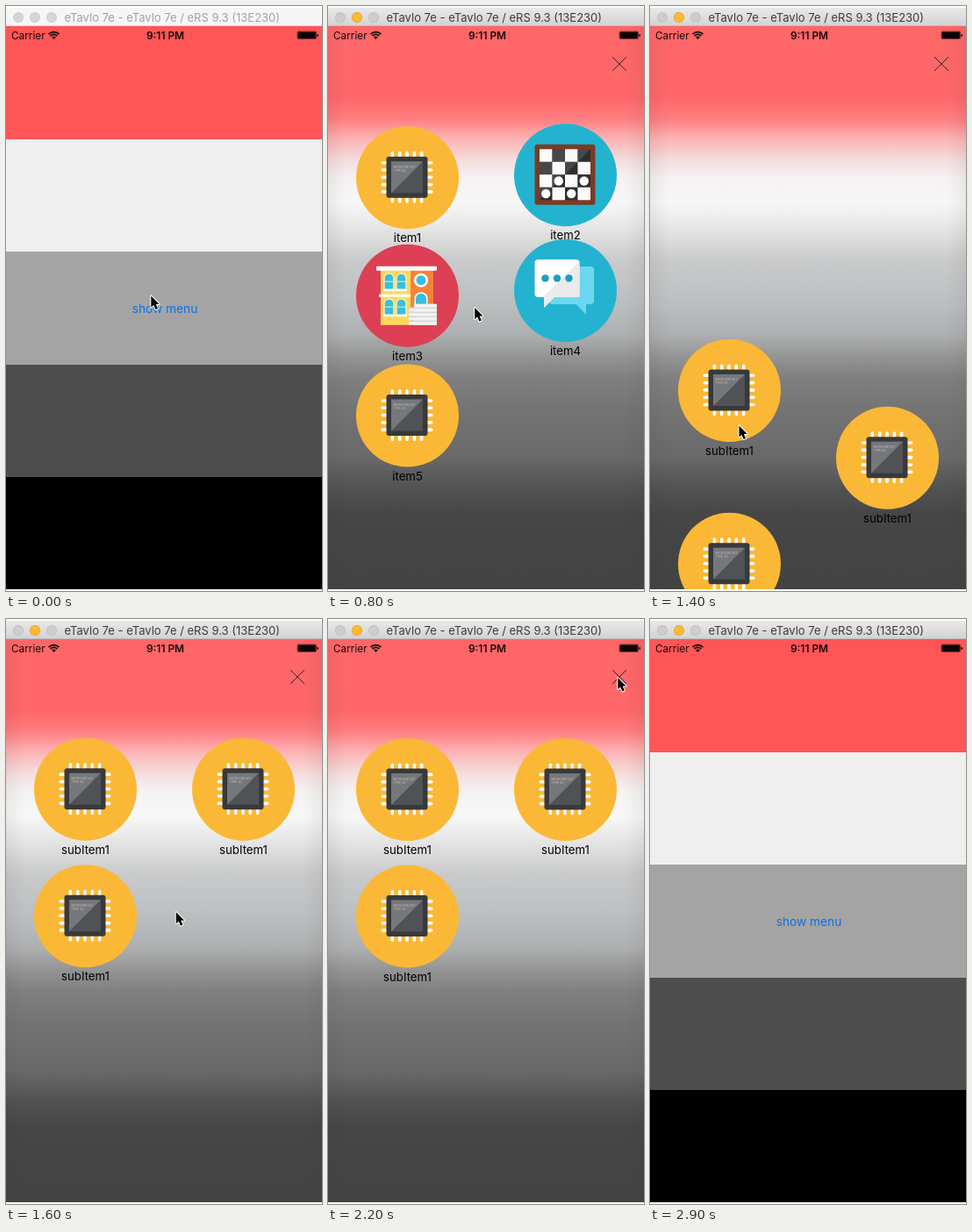
These frames come from a looping animation (360 px wide and 667 px high, 3000 ms). An HTML page with a canvas:

```html
<!DOCTYPE html>
<html lang="en">
<head>
<meta charset="utf-8">
<title>Pop menu</title>
<style>
  html, body { margin: 0; width: 100%; height: 100%; overflow: hidden; background: #fff; }
  canvas { display: block; }
</style>
</head>
<body>
<canvas id="stage" width="360" height="667"></canvas>
<script>
const c = document.getElementById('stage').getContext('2d');
const LOOP = 3000, STEP = 100;
const TOP = 23, BOTTOM = 665;
const AMBER = '#fbb836', CYAN = '#23b3d1', RED = '#dd3f54', INK = '#1a0a0a';

function rect(x, y, w, h, color, r = 0) {
  c.fillStyle = color;
  c.beginPath();
  c.roundRect(x, y, w, h, r);
  c.fill();
}
function disc(x, y, r, color) {
  c.fillStyle = color;
  c.beginPath();
  c.arc(x, y, r, 0, Math.PI * 2);
  c.fill();
}
function poly(points, color) {
  c.fillStyle = color;
  c.beginPath();
  points.forEach(([x, y]) => c.lineTo(x, y));
  c.closePath();
  c.fill();
}
function text(str, x, y, size, color, align = 'left', weight = 400) {
  c.font = `${weight} ${size}px Inter, sans-serif`;
  c.textAlign = align;
  c.fillStyle = color;
  c.fillText(str, x, y);
}
function gradient(x0, y0, x1, y1, stops) {
  const g = c.createLinearGradient(x0, y0, x1, y1);
  stops.forEach(([at, color]) => g.addColorStop(at, color));
  return g;
}

// Icons are drawn around their centre.
function chip() {
  for (let i = -2; i <= 2; i++) {
    rect(i * 8.3 - 1.8, -29.5, 3.6, 59, '#fff', 1.8);
    rect(-29.5, i * 8.3 - 1.8, 59, 3.6, '#fff', 1.8);
  }
  rect(-23.5, -23.5, 47, 47, '#38393b', 3);
  rect(-18, -18, 36, 36, '#505255');
  poly([[-18, -18], [18, -18], [-18, 18]], '#75787b');
  text('MICROCIRCUIT', -15.5, -10.5, 3.4, '#d2bcb8');
  text('TYPE 40', -15.5, -6.5, 3.4, '#d2bcb8');
}
function board() {
  rect(-34.5, -34.5, 69, 69, '#7b3b25', 3);
  const cell = 14.5;
  for (let row = 0; row < 4; row++) {
    for (let col = 0; col < 4; col++) {
      const x = (col - 2) * cell, y = (row - 2) * cell;
      const dark = (row + col) % 2;
      rect(x, y, cell, cell, dark ? '#2c2e31' : '#f9f9f9');
      if (dark && row > 1) disc(x + cell / 2, y + cell / 2, 5.2, '#fff');
    }
  }
  poly([[-29, -29], [29, -29], [-29, 29]], 'rgba(255,255,255,.12)');
}
function archWindow(x, y, w, h, frame) {
  rect(x - w / 2 - 1.5, y - 1.5, w + 3, h + 2, frame, [w / 2 + 1.5, w / 2 + 1.5, 0, 0]);
  rect(x - w / 2, y, w, h, '#37bfdd', [w / 2, w / 2, 0, 0]);
}
function house() {
  rect(-30, -29, 34, 63, '#fbd85c');
  rect(4, -29, 26, 63, '#f7833a');
  rect(-35, -33, 69, 5, '#fff', 1);
  for (const y of [-24, 5]) {
    for (const x of [-20.5, -6.5]) {
      archWindow(x, y, 9.5, 17, '#fdeeb0');
      rect(x - 6.5, y + 17, 13, 2.5, '#fff');
      rect(x - 4.5, y + 8, 9, 1, '#fdeeb0');
    }
  }
  rect(-32, -1, 36, 3, '#fff');
  disc(16, -17, 8, '#fff');
  disc(16, -17, 5.5, '#37bfdd');
  archWindow(16, -2, 12, 14, '#fff');
  rect(8, 10, 26, 24, '#f2f2f2');
  for (let i = 0; i < 4; i++) {
    rect(2, 14 + i * 5, 32, 5, '#f2f2f2');
    rect(2, 14 + i * 5, 32, 1.2, '#cfcfd2');
  }
}
function chat() {
  rect(-18, -27, 51, 43, '#6cd8f0', 4);
  poly([[11, 14], [24, 14], [24, 28]], '#6cd8f0');
  rect(-34.5, -35, 51, 43, '#fff', 4);
  poly([[-24, 6], [-24, 20], [-10, 6]], '#fff');
  poly([[16.5, -33], [16.5, 8], [-12, 8], [-24, 20], [-24, 7]], '#e9ebec');
  for (const x of [-22.5, -9, 4.5]) disc(x, -13.5, 4.2, '#1b9fbd');
}

const chipItem = label => [label, AMBER, chip];
const MENU = [chipItem('item1'), ['item2', CYAN, board], ['item3', RED, house],
  ['item4', CYAN, chat], chipItem('item5')];
const SUBMENU = Array(3).fill(chipItem('subItem1'));

// Remaining distance of an underdamped spring, 1 at rest below the screen.
function spring(phase) {
  if (phase <= 0) return 1;
  return Math.exp(-0.8 * phase) * (Math.cos(phase) + 0.8 * Math.sin(phase));
}
function menu(items, phase, rowLag, colLag) {
  items.forEach(([label, color, icon], i) => {
    const col = i % 2, row = Math.floor(i / 2);
    const rest = 194.5 + 144.5 * row;
    const y = rest + (725 - rest) * spring(phase - row * rowLag - col * colLag);
    c.save();
    c.translate(90.5 + 180 * col, y);
    disc(0, 0, 58.5, color);
    text(label, 0, 73.5, 13.2, '#000', 'center');
    c.translate(-0.5, -0.5);
    icon();
    c.restore();
  });
}

function bands() {
  ['#ff5557', '#efefef', '#a4a4a4', '#4d4d4d', '#000'].forEach((color, i) => {
    const y = Math.round(TOP + i * 128.4 + 0.3);
    rect(0, y, 360, BOTTOM - y, color);
  });
}
const BLUR = [[23, '#ff6668'], [105, '#ff6769'], [128, '#ff7d7f'], [152, '#fbb4b5'],
  [175, '#f5dcdc'], [195, '#f4f1f1'], [225, '#f7f7f7'], [255, '#e4e4e4'], [290, '#c9cacb'],
  [340, '#bbbebf'], [375, '#adafb0'], [400, '#949494'], [425, '#7f7f7f'], [460, '#747474'],
  [515, '#696969'], [550, '#525252'], [580, '#464646'], [665, '#434343']];
function blurred() {
  const stops = BLUR.map(([y, color]) => [(y - TOP) / (BOTTOM - TOP), color]);
  rect(0, TOP, 360, BOTTOM - TOP, gradient(0, TOP, 0, BOTTOM, stops));
  const shade = 'rgba(70,50,50,.07)', clear = 'rgba(70,50,50,0)';
  rect(0, TOP, 360, BOTTOM - TOP, gradient(0, 0, 360, 0,
    [[0, shade], [0.06, clear], [0.94, clear], [1, shade]]));
}
function closeButton() {
  c.strokeStyle = '#40282a';
  c.lineWidth = 1;
  c.beginPath();
  c.moveTo(324, 58); c.lineTo(340, 74);
  c.moveTo(340, 58); c.lineTo(324, 74);
  c.stroke();
}

function titleBar(active) {
  rect(0, 2, 360, 21, active ? gradient(0, 2, 0, 23, [[0, '#e9e9e9'], [1, '#d2d2d2']]) : '#f6f6f6');
  rect(0, 22, 360, 1, active ? '#bcbcbc' : '#dedede');
  [14, 33, 52].forEach((x, i) => {
    const lit = active && i === 1;
    disc(x, 13, 6, lit ? '#e2a030' : active ? '#bdbdbd' : '#cacaca');
    disc(x, 13, 5.3, lit ? '#fdb92f' : active ? '#cdcdcd' : '#d6d6d6');
  });
  text('eTavlo 7e - eTavlo 7e / eRS 9.3 (13E230)', 66.5, 17.8, 13, active ? '#3c3c3c' : '#a2a2a2');
}
function statusBar() {
  text('Carrier', 6, 38, 11.8, INK);
  text('9:11 PM', 181.5, 38, 11.9, INK, 'center', 600);
  c.strokeStyle = INK;
  c.lineWidth = 1.7;
  for (const r of [5.6, 8.4]) {
    c.beginPath();
    c.arc(54.5, 38, r, -Math.PI * 0.75, -Math.PI * 0.25);
    c.stroke();
  }
  c.fillStyle = INK;
  c.beginPath();
  c.moveTo(54.5, 38);
  c.arc(54.5, 38, 3.4, -Math.PI * 0.75, -Math.PI * 0.25);
  c.fill();
  rect(331.5, 28.5, 22.5, 9.5, 'rgba(26,10,10,.55)', 2);
  rect(332.7, 29.7, 20, 7.2, '#0c0505', 1);
  rect(354.3, 32, 1.5, 3, '#0c0505', 0.7);
}

// Pointer stops: time, x, y.
const PATH = [[0, 165.3, 330.5], [500, 167.2, 344], [800, 167.2, 344], [1300, 101.5, 478.5],
  [1400, 101.5, 478.5], [1800, 286, 190], [2200, 330.2, 67], [2400, 330.2, 67],
  [2600, 349, 300], [2800, 372, 455], [3000, 372, 455]];
function pointer(t) {
  const i = PATH.findIndex(stop => stop[0] > t);
  const [t0, x0, y0] = PATH[i - 1], [t1, x1, y1] = PATH[i];
  const k = (t - t0) / (t1 - t0), e = k * k * (3 - 2 * k);
  c.save();
  c.translate(x0 + (x1 - x0) * e, y0 + (y1 - y0) * e);
  c.strokeStyle = '#fff';
  c.lineWidth = 2;
  c.lineJoin = 'round';
  poly([[0, 0], [0, 13], [3, 10.4], [5.2, 15.6], [7.6, 14.6], [5.4, 9.6], [9.3, 9.4]], '#000');
  c.stroke();
  c.fill();
  c.restore();
}

function draw(t) {
  rect(0, 0, 360, 667, '#fff');
  titleBar(t >= 300);
  c.save();
  c.beginPath();
  c.rect(0, TOP, 360, BOTTOM - TOP);
  c.clip();
  if (t >= 700 && t < 2400) {
    blurred();
    if (t < 1400) menu(MENU, 5.55 + (t - 800) * 0.043, 0.95, 0.33);
    else menu(SUBMENU, 1.14 + (t - 1400) * 0.043, 0.505, 0.235);
    closeButton();
  } else {
    bands();
    text('show menu', 181, 350, 13.7, t === 600 ? '#8199b2' : '#0a72e6', 'center');
  }
  statusBar();
  pointer(t);
  c.restore();
}
function tick() {
  draw(Math.floor(performance.now() % LOOP / STEP) * STEP);
  requestAnimationFrame(tick);
}
tick();
</script>
</body>
</html>
```
